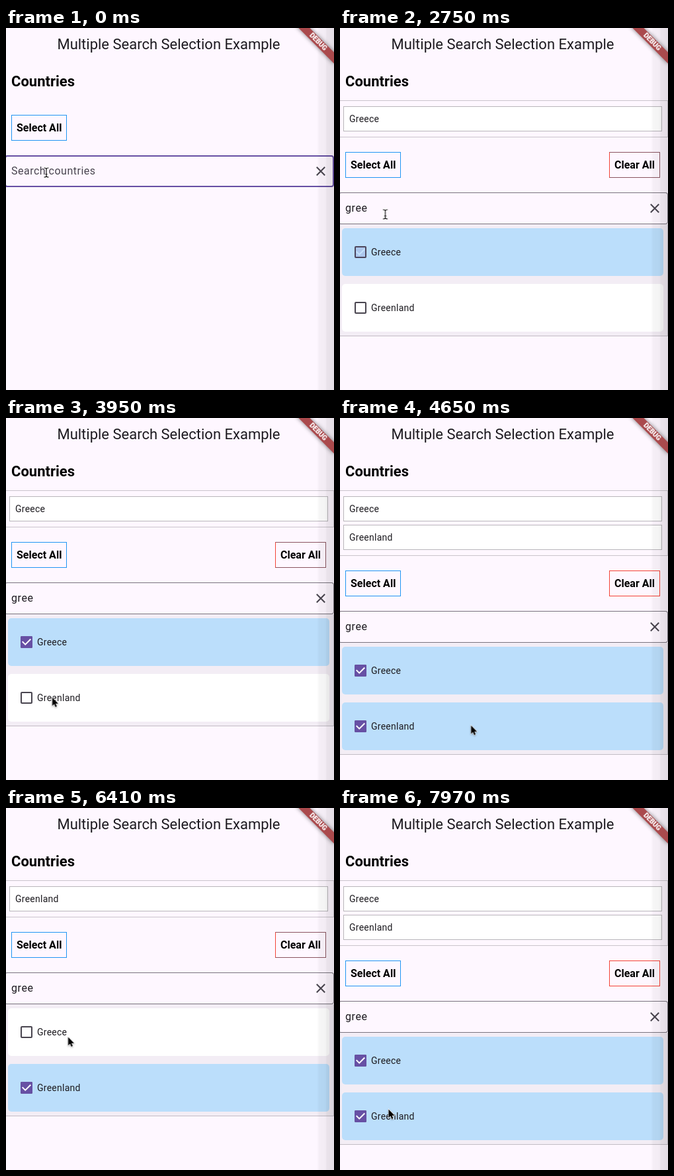
These frames come from a looping animation (496 by 546 pixels, 8 s). An HTML page:

```html
<!DOCTYPE html>
<html lang="en">
<head>
<meta charset="utf-8">
<title>Multiple Search Selection Example</title>
<style>
  :root { --purple: #6750a4; --ink: #1d1b20; --soft: #49454f; --blue: #bbdefb; }
  html, body { margin: 0; width: 100%; height: 100%; overflow: hidden; background: #fef7ff; }
  * { box-sizing: border-box; }
  .stage { position: relative; width: 496px; height: 546px; overflow: hidden;
    font: 14px/20px Roboto, sans-serif; color: var(--ink); }
  .stage *, .stage *::after { animation-duration: 8s; animation-iteration-count: infinite; animation-timing-function: step-end; }
  .title, h1, .button, .field, .chip, .edge, .cursor, .close { position: absolute; }
  .title { left: 0; top: 11px; width: 492px; text-align: center; font-size: 22px; line-height: 28px; }
  h1 { margin: 0; left: 8px; top: 67px; font-size: 22px; line-height: 28px; color: #000; }

  .body { position: absolute; left: 0; top: 109px; width: 496px; }
  .chips { position: relative; height: 0; margin-left: -1px; overflow: hidden;
    box-shadow: inset 0 0 0 1px #cac5cc; animation-name: chips; }
  .chip { left: 6px; width: 482px; height: 38px; padding-left: 8px; border: 1px solid #b9b6bb;
    background: #fff; line-height: 36px; letter-spacing: .25px; }
  .chip span { position: absolute; }
  .chip:nth-child(1) { top: 9px; }
  .chip:nth-child(2) { top: 52px; animation-name: second; }
  .alone { animation-name: alone; }
  .paired { animation-name: paired; }

  .lower { position: relative; height: 340px; }
  .button { top: 22px; height: 39px; padding: 0 7px; border: 1px solid #2196f3;
    font: bold 16px/37px Roboto, sans-serif; color: #000; white-space: nowrap; }
  .all { left: 8px; }
  .clear { right: 12px; animation-name: clear; }

  .field { left: -2px; top: 83px; width: 498px; height: 48px; padding-left: 10px; border-radius: 4px;
    display: flex; align-items: center; font-size: 16px; line-height: 24px; letter-spacing: .03125em;
    animation-name: focus; }
  .hint { position: absolute; color: var(--soft); animation-name: hint; }
  .field b { font-weight: 400; }
  .k1 { animation-name: key1; }
  .k2 { animation-name: key2; }
  .k3 { animation-name: key3; }
  .k4 { animation-name: key4; }
  .caret { width: 2px; height: 26px; background: var(--purple); animation-name: caret; }
  .close { left: 471px; top: 17px; }

  .list { position: absolute; left: -1px; top: 131px; width: 497px; height: 0; overflow: hidden;
    background: #f3edf5; animation-name: list; }
  .list::after { content: ""; position: absolute; inset: 0; border: 1px solid #c2bdc5; border-top: 0; }
  .row { display: flex; align-items: center; width: 486px; height: 72px; margin: 6px 4px 12px; padding-left: 19px;
    border-radius: 5px; background: #fff; letter-spacing: .25px; }
  .row svg { margin-right: 7px; }
  .greece { animation-name: greece; }
  .greenland { animation-name: greenland; }
  .stage .tick { animation-timing-function: linear; opacity: 0; }
  .greece .tick { animation-name: tick1; }
  .greenland .tick { animation-name: tick2; }

  .edge { inset: 0 0 0 auto; width: 26px; background: linear-gradient(90deg, transparent, rgba(0,0,0,.035) 4px,
    rgba(0,0,0,.045) 13px, rgba(0,0,0,.08) 15px, rgba(0,0,0,.1)); }
  .ribbon { position: absolute; left: 496px; top: -3px; transform: rotate(45deg); }
  .ribbon span { position: absolute; left: -40px; top: 28px; width: 80px; height: 12px; text-align: center;
    font: 900 10.2px/12px Roboto, sans-serif; color: #fff; background: #aa4a4d; box-shadow: 0 0 6px rgba(0,0,0,.5); }

  .stage .cursor { left: 0; top: 0; animation-name: move; animation-timing-function: linear; overflow: visible; }
  .beam { animation-name: beam; }
  .arrow { animation-name: arrow; filter: drop-shadow(0 1px 1px rgba(0,0,0,.3)); }

  @keyframes chips { 0% { height: 0 } 34% { height: 56px } 51.875% { height: 99px } 72.25% { height: 56px } 88.5%, to { height: 99px } }
  @keyframes second { 0%, 72.25% { opacity: 0 } 51.875%, 88.5%, to { opacity: 1 } }
  @keyframes alone { 0%, 72.25% { opacity: 0 } 0%, 88.5%, to { opacity: 0 } 72.25% { opacity: 1 } }
  @keyframes paired { 0%, 88.5%, to { opacity: 1 } 72.25% { opacity: 0 } }
  @keyframes clear {
    0% { opacity: 0; border-color: #f44336 }
    34%, 72.25% { opacity: 1; border-color: #8a5560 #8a5560 #8a5560 #f44336 }
    51.875%, 88.5%, to { opacity: 1; border-color: #f44336 }
  }
  @keyframes focus {
    0% { box-shadow: inset 0 0 0 2px var(--purple) }
    34%, to { box-shadow: inset 0 0 0 1px #79747e }
  }
  @keyframes hint { 0% { opacity: 1 } 13.75%, to { opacity: 0 } }
  @keyframes key1 { 0% { font-size: 0 } 13.75%, to { font-size: 16px } }
  @keyframes key2 { 0% { font-size: 0 } 18.25%, to { font-size: 16px } }
  @keyframes key3 { 0% { font-size: 0 } 21.25%, to { font-size: 16px } }
  @keyframes key4 { 0% { font-size: 0 } 23.125%, to { font-size: 16px } }
  @keyframes caret { 0%, 11.875%, 29.375%, to { opacity: 0 } 5.625%, 13.75% { opacity: 1 } }
  @keyframes list { 0% { height: 0; opacity: 0 } 21.25% { height: 200px; opacity: 1 } 23.125%, to { height: 169px; opacity: 1 } }
  @keyframes greece { 0%, 72.25% { background: #fff } 34%, 88.5%, to { background: var(--blue) } }
  @keyframes greenland { 0% { background: #fff } 51.875%, to { background: var(--blue) } }
  @keyframes tick1 { 0%, 34%, 74.75%, 88.5% { opacity: 0 } 36.5%, 72.25%, 91%, to { opacity: 1 } }
  @keyframes tick2 { 0%, 51.875% { opacity: 0 } 54.375%, to { opacity: 1 } }
  @keyframes move {
    0%, 26.49% { transform: translate(61px, 218px) }
    26.5% { transform: translate(68.5px, 228px) }
    30.625%, 36.75% { transform: translate(68.5px, 281px) }
    40% { transform: translate(76px, 180px) }
    46.75%, 53.75% { transform: translate(69.5px, 421px) }
    58.125% { transform: translate(197.5px, 464px) }
    60.5%, 65.75% { transform: translate(225px, 312px) }
    70.625%, 77% { transform: translate(150px, 140px) }
    80.125% { transform: translate(93.5px, 345px) }
    83%, 95.125% { transform: translate(91px, 345px) }
    99.5%, to { transform: translate(73px, 454px) }
  }
  @keyframes beam {
    0%, 34%, 41.9%, 60.1%, 78.65% { opacity: 1 }
    27.4%, 37.8%, 43.25%, 66.35%, 79.4%, to { opacity: 0 }
  }
  @keyframes arrow {
    0%, 34%, 41.9%, 60.1%, 78.65% { opacity: 0 }
    27.4%, 37.8%, 43.25%, 66.35%, 79.4%, to { opacity: 1 }
  }
</style>
</head>
<body>
<svg width="0" height="0" style="position:absolute">
  <symbol id="box" viewBox="0 0 18 18">
    <rect x="1" y="1" width="16" height="16" rx="1" fill="none" stroke="#49454f" stroke-width="2"/>
  </symbol>
  <symbol id="check" viewBox="0 0 18 18">
    <rect width="18" height="18" rx="2" fill="#6750a4"/>
    <path d="M2.7 8.1 7.2 12.6 15.3 4.5" fill="none" stroke="#fff" stroke-width="2"/>
  </symbol>
</svg>
<div class="stage">
  <div class="title">Multiple Search Selection Example</div>
  <h1>Countries</h1>

  <div class="body">
    <div class="chips">
      <div class="chip"><span class="paired">Greece</span><span class="alone">Greenland</span></div>
      <div class="chip"><span>Greenland</span></div>
    </div>
    <div class="lower">
      <div class="button all">Select All</div>
      <div class="button clear">Clear All</div>
      <div class="list">
        <div class="row greece">
          <svg width="18" height="18"><use href="#box"/><use class="tick" href="#check"/></svg>Greece
        </div>
        <div class="row greenland">
          <svg width="18" height="18"><use href="#box"/><use class="tick" href="#check"/></svg>Greenland
        </div>
        <div class="row">
          <svg width="18" height="18"><use href="#box"/></svg>Grenada
        </div>
      </div>
      <div class="field">
        <span class="hint">Search countries</span>
        <b class="k1">g</b><b class="k2">r</b><b class="k3">e</b><b class="k4">e</b><i class="caret"></i>
        <svg class="close" width="14" height="14"><path d="M.8.8 13.2 13.2M13.2.8.8 13.2" stroke="#49454f" stroke-width="2"/></svg>
      </div>
    </div>
  </div>

  <div class="edge"></div>
  <div class="ribbon"><span>DEBUG</span></div>

  <svg class="cursor" width="1" height="1">
    <g class="beam" fill="none">
      <path id="bar" d="M-3.5-7Q0-7 0-5Q0-7 3.5-7M0-5V5M-3.5 7Q0 7 0 5Q0 7 3.5 7M-1.5 2.5H1.5" stroke="#fff" stroke-opacity=".6" stroke-width="2.6"/>
      <path d="M-3.5-7Q0-7 0-5Q0-7 3.5-7M0-5V5M-3.5 7Q0 7 0 5Q0 7 3.5 7M-1.5 2.5H1.5" stroke="#111" stroke-width="1.2"/>
    </g>
    <path class="arrow" d="M.5.5V13.2L3.4 10.5 5.3 15 7.4 14.1 5.5 9.7H9.5Z" fill="#000" stroke="#fff" stroke-width="1.2" paint-order="stroke"/>
  </svg>
</div>
</body>
</html>
```
